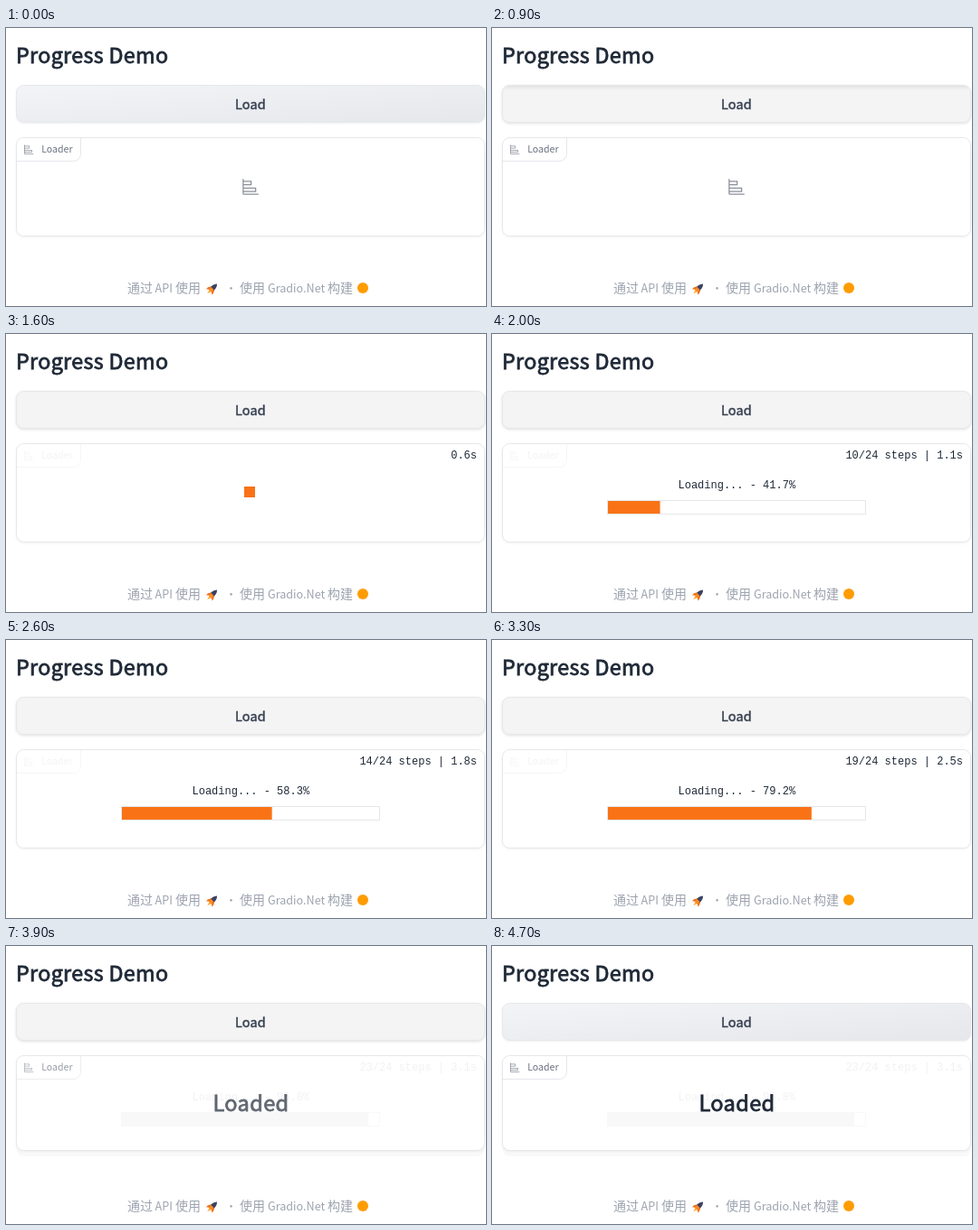
An HTML page for the animation above (5100 ms loop, 530 by 308 pixels).

```html
<!DOCTYPE html>
<html lang="zh-CN">
<head>
<meta charset="utf-8">
<title>Progress Demo</title>
<style>
  html, body { margin: 0; width: 100%; height: 100%; overflow: hidden; background: #fff; }
  svg { display: block; width: 530px; height: 308px; }
  text { font-family: "Noto Sans CJK SC", "Noto Sans CJK", "Noto Sans", sans-serif; white-space: pre; }
  /* A thin stroke gives a weight between regular and bold. */
  .strong { font-weight: 400; fill: #1f2937; stroke: #1f2937; stroke-width: .034em; letter-spacing: .014em; }
  .soft { fill: #374151; stroke: #374151; }
  .mono { font: 12px "Liberation Mono", monospace; fill: #1f2937; }
  .foot { font-size: 14px; fill: #9ca3af; }
  .latin { font-size: 12.6px; }
  .rest { filter: drop-shadow(0 1px 1px rgba(0, 0, 0, .05)); }
  .hover { filter: drop-shadow(0 1px 1.5px rgba(0, 0, 0, .12)); }
</style>
</head>
<body>
<svg viewBox="0 0 530 308" xmlns="http://www.w3.org/2000/svg">
  <defs>
    <linearGradient id="sheen" x2="1" y2="1">
      <stop stop-color="#f3f4f6"/><stop offset="1" stop-color="#e5e7eb"/>
    </linearGradient>
    <linearGradient id="inset" x2="0" y2="1">
      <stop stop-opacity=".07"/><stop offset=".12" stop-opacity="0"/>
    </linearGradient>
    <path id="chart" d="M4 2H2v26a2 2 0 0 0 2 2h26v-2H4v-3h22v-8H4v-4h14V5H4ZM24 19v4H4v-4ZM16 7v4H4V7Z" fill-rule="evenodd" fill="#8b909b"/>
  </defs>

  <text class="strong" x="11" y="39" font-size="23.3">Progress Demo</text>

  <rect id="button" x="11.5" y="63.5" width="517" height="41" rx="8" stroke="#e5e7eb"/>
  <rect id="press" x="12" y="64" width="516" height="40" rx="7.5" fill="url(#inset)"/>
  <text class="strong soft" x="270" y="90" font-size="14.4" text-anchor="middle">Load</text>

  <rect id="trace" x="11.5" y="200" width="517" height="33" rx="8" fill="#f9f9f9"/>
  <rect id="block" class="rest" x="11.5" y="121.5" width="517" rx="8" fill="#fff" stroke="#e5e7eb"/>

  <g id="label">
    <path id="edge" d="M12 147.500H74.500a8 8 0 0 0 8-8V122" fill="none"/>
    <use href="#chart" transform="translate(19.300 128.700) scale(.365)"/>
    <text x="39.200" y="138" font-size="10.600" fill="#6b7280">Loader</text>
  </g>
  <use id="empty" href="#chart" transform="translate(260 166) scale(.625)"/>
  <rect id="spinner" x="263" y="169" width="12" height="12" fill="#f97316"/>

  <text id="meta" class="mono" x="520" y="138" text-anchor="end"></text>
  <g id="progress">
    <text id="status" class="mono" x="270.300" y="171" text-anchor="middle"></text>
    <rect id="track" x="127.500" y="184.500" width="285" height="15" fill="#fff"/>
    <rect id="fill" x="128" y="185" height="14"/>
  </g>
  <text id="result" class="strong" x="270.500" y="183" font-size="23.6" text-anchor="middle">Loaded</text>

  <g class="foot">
    <text x="134" y="293">通过</text>
    <text class="latin" x="164.500" y="293">API</text>
    <text x="187" y="293">使用</text>
    <g transform="translate(228 288.500) rotate(45) scale(.9)">
      <path d="M-2 3L0 9L2 3Z" fill="#ffac33"/>
      <path d="M-2.500-1L-5 3V6L-2 4H2L5 6V3L2.500-1Z" fill="#f4741f"/>
      <path d="M0-8C3-5 3.500-1 2.300 3H-2.300C-3.500-1-3-5 0-8Z" fill="#3b4262"/>
      <path d="M-2.600 0H2.600L2.300 4H-2.300Z" fill="#ff8a1f"/>
    </g>
    <text x="248.500" y="293" text-anchor="middle" class="latin">·</text>
    <text x="258" y="293">使用</text>
    <text class="latin" x="289" y="293">Gradio.Net</text>
    <text x="355" y="293">构建</text>
    <circle cx="394" cy="288" r="6" fill="#ff9c00"/>
  </g>
</svg>
<script>
const LOOP = 5100, TICK = 100;
const HOVER = 300, PRESS = 900, START = 1000, BAR = 2000, DONE = 3900, LEAVE = 4700;
const TOTAL = 24, RATE = 0.00743, FIRST = 10.3, EASE = 83;
const LINE = '#e5e7eb', GREY = '#909090', ORANGE = '#f97316';

const el = {};
for (const node of document.querySelectorAll('[id]')) el[node.id] = node;

const set = (node, attrs) => {
  for (const key in attrs) node.setAttribute(key, attrs[key]);
};
const show = (node, opacity) => node.setAttribute('opacity', Number(opacity));

function drawButton(t) {
  const over = t >= HOVER && t < LEAVE;
  set(el.button, { fill: over ? '#f4f4f5' : 'url(#sheen)', class: over ? 'hover' : 'rest' });
  show(el.press, t >= PRESS && t < START);
}

function drawProgress(t) {
  const now = Math.min(t, DONE - TICK);
  const exact = FIRST + (now - BAR) * RATE;
  const step = Math.floor(exact);
  const eased = Math.min(1, (exact - step) / RATE / EASE);
  const from = step === 10 ? 0 : step - 1;
  const level = from + (step - from) * eased;
  const seconds = Math.max(0, 0.2 + (now - 1200) * 0.001115).toFixed(1) + 's';

  el.meta.textContent = t >= BAR ? `${step}/${TOTAL} steps | ${seconds}` : seconds;
  el.status.textContent = `Loading... - ${(step / TOTAL * 100).toFixed(1)}%`;
  el.fill.setAttribute('width', Math.max(0, 284 * level / TOTAL));
}

function draw(time) {
  const t = Math.floor(time % LOOP / TICK) * TICK;
  const loading = t >= START && t < DONE;
  const done = t >= DONE;
  const settling = t === DONE;

  drawButton(t);
  drawProgress(t);

  el.block.setAttribute('height', done ? 105 : 109);
  show(el.trace, done);
  show(el.label, loading ? 0.08 : settling ? 0.7 : 1);
  el.edge.setAttribute('stroke', loading ? GREY : LINE);
  show(el.empty, t < START);
  show(el.spinner, loading && t < BAR);
  show(el.result, done ? (settling ? 0.7 : 1) : 0);

  // The finished overlay stays as a faint grey trace.
  const overlay = done ? 0.06 : 1;
  show(el.meta, t >= START ? overlay : 0);
  show(el.progress, t >= BAR ? overlay : 0);
  el.track.setAttribute('stroke', done ? GREY : LINE);
  el.fill.setAttribute('fill', done ? GREY : ORANGE);
}

const begin = performance.now();
function frame() {
  draw(performance.now() - begin);
  requestAnimationFrame(frame);
}
frame();
</script>
</body>
</html>
```
